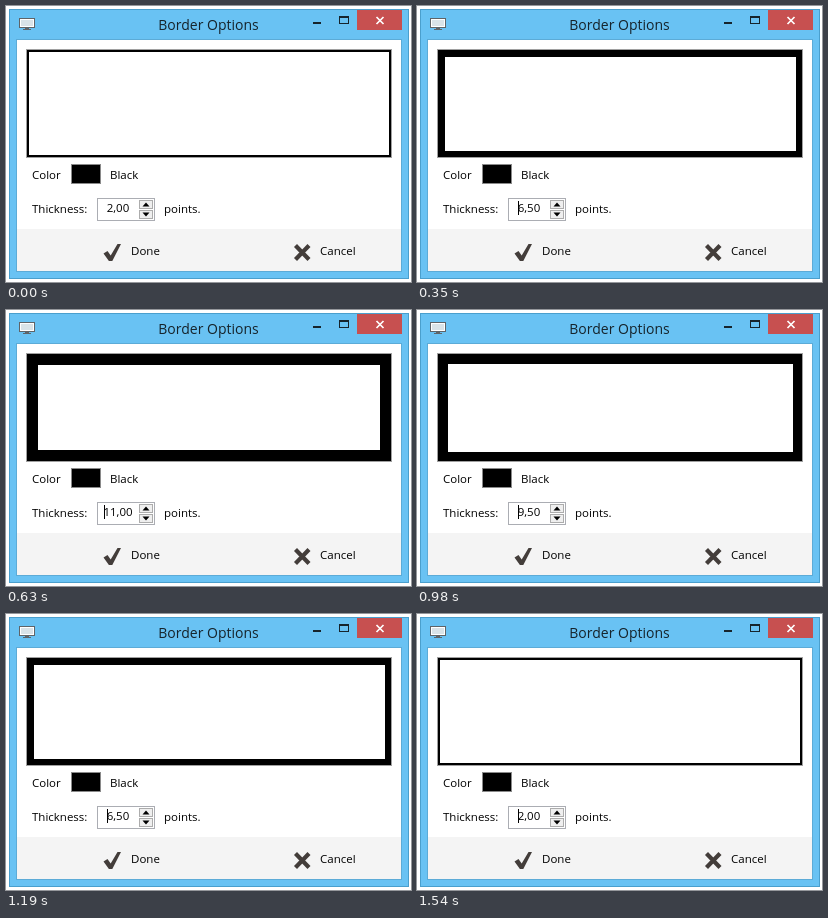
Recreate the animation shown at these times as an HTML page. Size 405 px wide and 276 px high, loop 1750 ms.

```html
<!DOCTYPE html>
<html lang="en">
<head>
<meta charset="utf-8">
<title>Border Options</title>
<style>
  html, body { margin: 0; width: 100%; height: 100%; overflow: hidden; background: #fff; }
  svg { display: block; width: 405px; height: 276px; }
  text { font: 11.5px "Open Sans", "Noto Sans", sans-serif; fill: #000; }
  .title { font-size: 14px; fill: #16242c; }
  .mid { text-anchor: middle; }
  .crisp { shape-rendering: crispEdges; }
</style>
</head>
<body>
<svg viewBox="0 0 405 276">
  <!-- window -->
  <g class="crisp">
    <rect x="3" y="3" width="400" height="270" fill="#4a9fcd"/>
    <rect x="4" y="4" width="398" height="268" fill="#69c2f3"/>
    <rect x="10" y="33" width="386" height="233" fill="#5cabd7"/>
    <rect x="11" y="34" width="384" height="231" fill="#fff"/>
    <rect x="11" y="223" width="384" height="42" fill="#f4f4f4"/>
  </g>

  <!-- title bar -->
  <g class="crisp">
    <rect x="13" y="12" width="16" height="10" fill="#5f6468"/>
    <rect x="14" y="13" width="14" height="8" fill="#fff"/>
    <rect x="15" y="14" width="12" height="6" fill="#d9e3e8"/>
    <path d="M19 22h4v1h2v1h-8v-1h2z" fill="#5f6468"/>
    <rect x="307" y="16" width="8" height="2" fill="#16242c"/>
    <path d="M333 10h10v8h-10zM334 12v5h8v-5z" fill="#16242c" fill-rule="evenodd"/>
    <rect x="351" y="4" width="45" height="20" fill="#c75050"/>
  </g>
  <path d="M370.5 11l7 7M377.5 11l-7 7" stroke="#fff" stroke-width="1.7"/>
  <text class="title mid" x="202.5" y="24">Border Options</text>

  <!-- preview -->
  <g class="crisp">
    <rect x="20" y="43" width="366" height="109" fill="#a0a0a0"/>
    <rect x="21" y="44" width="364" height="107"/>
    <rect id="inner" fill="#fff"/>
  </g>

  <!-- colour and thickness -->
  <text x="26" y="173">Color</text>
  <text x="104" y="173">Black</text>
  <text x="26" y="207">Thickness:</text>
  <text x="158" y="207">points.</text>
  <g class="crisp">
    <rect x="65" y="158" width="30" height="20" fill="#8a8a8a"/>
    <rect x="66" y="159" width="28" height="18"/>
    <rect x="91" y="192" width="58" height="23" fill="#abadb3"/>
    <rect x="92" y="193" width="56" height="21" fill="#fff"/>
    <g id="spin">
      <rect x="133" y="194" width="14" height="9" fill="#acacac"/>
      <rect x="134" y="195" width="12" height="7" fill="#efefef"/>
      <rect x="133" y="204" width="14" height="9" fill="#acacac"/>
      <rect x="134" y="205" width="12" height="7" fill="#efefef"/>
    </g>
  </g>
  <path d="M136.5 200.5l3.5-4 3.5 4zM136.5 206.5l3.5 4 3.5-4z"/>
  <text class="mid" id="value" x="112" y="206"></text>
  <rect class="crisp" id="caret" y="195" width="1" height="14"/>

  <!-- buttons -->
  <path d="M97.5 247.5l4-2.5 3.2 4.5 6.8-11.5h3.5l-8.7 17h-3.4z" fill="#433d3a"/>
  <path d="M289.5 239.5l13.5 14M303 239.5l-13.5 14" stroke="#433d3a" stroke-width="4.2"/>
  <text x="125" y="249">Done</text>
  <text x="314" y="249">Cancel</text>
</svg>
<script>
  const LOOP = 1750;
  const STEP = 1.5;
  const ups = [140, 210, 350, 420, 490, 630];
  const downs = [980, 1050, 1190, 1260, 1400, 1540];
  const [inner, value, caret] = ["inner", "value", "caret"].map(id => document.getElementById(id));

  const passed = (times, t) => times.filter(s => t >= s).length;

  function setAttrs(el, attrs) {
    for (const name in attrs) el.setAttribute(name, attrs[name]);
  }

  function draw(t) {
    const points = 2 + STEP * (passed(ups, t) - passed(downs, t));
    const left = Math.round(21 + points), right = Math.round(385 - points);
    const top = Math.round(44 + points), bottom = Math.round(151 - points);
    setAttrs(inner, { x: left, y: top, width: right - left, height: bottom - top });
    value.textContent = points.toFixed(2).replace(".", ",");
    setAttrs(caret, {
      x: points < 10 ? 101 : 98,
      visibility: t >= ups[0] ? "visible" : "hidden"
    });
  }

  const start = performance.now();
  function tick() {
    draw((performance.now() - start) % LOOP);
    requestAnimationFrame(tick);
  }
  tick();
</script>
</body>
</html>
```
